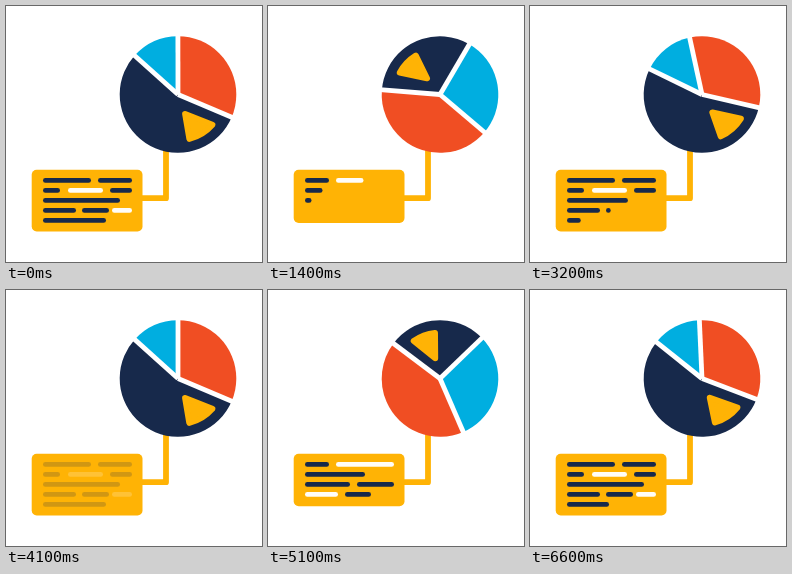
An HTML page with a canvas that plays this animation: 256x256 px, repeating every 6.7 s.

```html
<!DOCTYPE html>
<html lang="en">
<head>
<meta charset="utf-8">
<title>Pie chart callout</title>
<style>
  html, body { margin: 0; width: 100%; height: 100%; overflow: hidden; background: #fff; }
  canvas { display: block; width: 256px; height: 256px; }
</style>
</head>
<body>
<canvas id="stage" width="256" height="256"></canvas>
<script>
const ctx = document.getElementById('stage').getContext('2d');
const NAVY = '#17294b', CYAN = '#00aee0', RED = '#f04e23', AMBER = '#ffb305', WHITE = '#fffdf8';
const LOOP = 6700, CYCLE = 3300, STEP = 100;
const PIE = { x: 172, y: 88.5, r: 58.3 };

// Angles are degrees clockwise from twelve o'clock.
// cuts: red/navy, navy/cyan, cyan/red. wedge: tip, arc start, arc end.
// Rows hold [from, to, colour] dashes.
const states = [
  {
    cuts: [113, 312, 360], wedge: [160, 131.4, 165.7], lead: 10, bottom: 225.5,
    life: 1700, grow: 3.1, stagger: 0.6, power: 2.3,
    rows: [
      [[37, 85, NAVY], [92, 126, NAVY]],
      [[37, 54, NAVY], [62, 97, WHITE], [104, 126, NAVY]],
      [[37, 114, NAVY]],
      [[37, 70, NAVY], [76, 103, NAVY], [106, 126, WHITE]],
      [[37, 100, NAVY]]
    ]
  },
  {
    cuts: [307, 406, 516.5], wedge: [346.6, 325, 353.7], lead: 42, bottom: 216.3,
    life: 1800, grow: 3.7, stagger: 1, power: 2,
    rows: [
      [[37, 61, NAVY], [68, 126, WHITE]],
      [[37, 97, NAVY]],
      [[37, 82, NAVY], [89, 126, NAVY]],
      [[37, 70, WHITE], [77, 103, NAVY]]
    ]
  }
];

const clamp = v => Math.max(0, Math.min(1, v));
const mix = (a, b, p) => a + (b - a) * p;
const rad = deg => (deg - 90) * Math.PI / 180;
const polar = (deg, r) => [PIE.x + r * Math.cos(rad(deg)), PIE.y + r * Math.sin(rad(deg))];
const easeOut = x => 1 - (1 - x) ** 3;
const easeInOut = x => x < 0.5 ? 4 * x ** 3 : 1 - 4 * (1 - x) ** 3;

// Turn always runs clockwise, so the first state ends one full turn later.
function turn(from, to, p) {
  const extra = to[0] < from[0] ? 360 : 0;
  return from.map((a, i) => mix(a, to[i] + extra, p));
}

function drawPie(cuts, wedge) {
  const [rn, nc, cr] = cuts;
  [[rn, nc, NAVY], [nc, cr, CYAN], [cr, rn + 360, RED]].forEach(([a, b, colour]) => {
    ctx.fillStyle = colour;
    ctx.beginPath();
    ctx.moveTo(PIE.x, PIE.y);
    ctx.arc(PIE.x, PIE.y, PIE.r, rad(a), rad(b));
    ctx.fill();
  });

  ctx.strokeStyle = '#fff';
  ctx.lineWidth = 4.8;
  ctx.lineCap = 'butt';
  ctx.lineJoin = 'round';
  cuts.forEach(a => {
    ctx.beginPath();
    ctx.moveTo(PIE.x, PIE.y);
    ctx.lineTo(...polar(a, PIE.r + 2));
    ctx.stroke();
  });

  ctx.fillStyle = ctx.strokeStyle = AMBER;
  ctx.lineWidth = 6;
  ctx.beginPath();
  ctx.moveTo(...polar(wedge[0], 20.8));
  ctx.arc(PIE.x, PIE.y, 45.8, rad(wedge[1]), rad(wedge[2]));
  ctx.closePath();
  ctx.fill();
  ctx.stroke();
}

function drawCallout(bottom) {
  ctx.strokeStyle = ctx.fillStyle = AMBER;
  ctx.lineWidth = 5.8;
  ctx.lineJoin = 'round';
  ctx.beginPath();
  ctx.moveTo(160, 140);
  ctx.lineTo(160, 192.2);
  ctx.lineTo(134, 192.2);
  ctx.stroke();
  ctx.beginPath();
  ctx.roundRect(25.7, 163.7, 110.8, bottom - 163.7, 5);
  ctx.fill();
}

function drawRows(state, age, alpha) {
  const half = 2.35;
  ctx.globalAlpha = alpha;
  ctx.lineWidth = half * 2;
  ctx.lineCap = 'round';
  state.rows.forEach((row, i) => {
    const x = clamp((age / STEP - i * state.stagger) / state.grow);
    if (!x) return;
    const start = row[0][0], end = row[row.length - 1][1];
    const edge = mix(start, end, x ** state.power);
    const y = 174.4 + i * 10;
    row.forEach(([a, b, colour]) => {
      if (edge <= a) return;
      ctx.strokeStyle = colour;
      ctx.beginPath();
      ctx.moveTo(a + half, y);
      ctx.lineTo(Math.max(a + half + 0.01, Math.min(b, edge) - half), y);
      ctx.stroke();
    });
  });
  ctx.globalAlpha = 1;
}

function draw(time) {
  // The motion advances in tenths of a second.
  const t = Math.floor((time % LOOP) / STEP) * STEP;
  const u = Math.max(0, t - 100) % CYCLE + 100;
  const second = u >= 1200 && u < 2900;
  const now = states[second ? 1 : 0], before = states[second ? 0 : 1];
  const age = second ? u - 1100 : u >= 2900 ? u - 2800 : u + 500;

  const p = easeOut(clamp((age - 17) / 630));
  const wedge = turn(before.wedge, now.wedge, p).map(a => a + now.lead * p * (1 - p));
  const bottom = mix(before.bottom, now.bottom, easeInOut(clamp(age / 400)));
  const blink = clamp((age - now.life + 800) / 800);
  const alpha = 0.6 + 0.4 * Math.cos(blink * 2 * Math.PI);

  ctx.fillStyle = '#fff';
  ctx.fillRect(0, 0, 256, 256);
  drawCallout(bottom);
  drawPie(turn(before.cuts, now.cuts, p), wedge);
  drawRows(now, age, alpha);
}

const begin = performance.now();
function tick() {
  draw(performance.now() - begin);
  requestAnimationFrame(tick);
}
tick();
</script>
</body>
</html>
```
